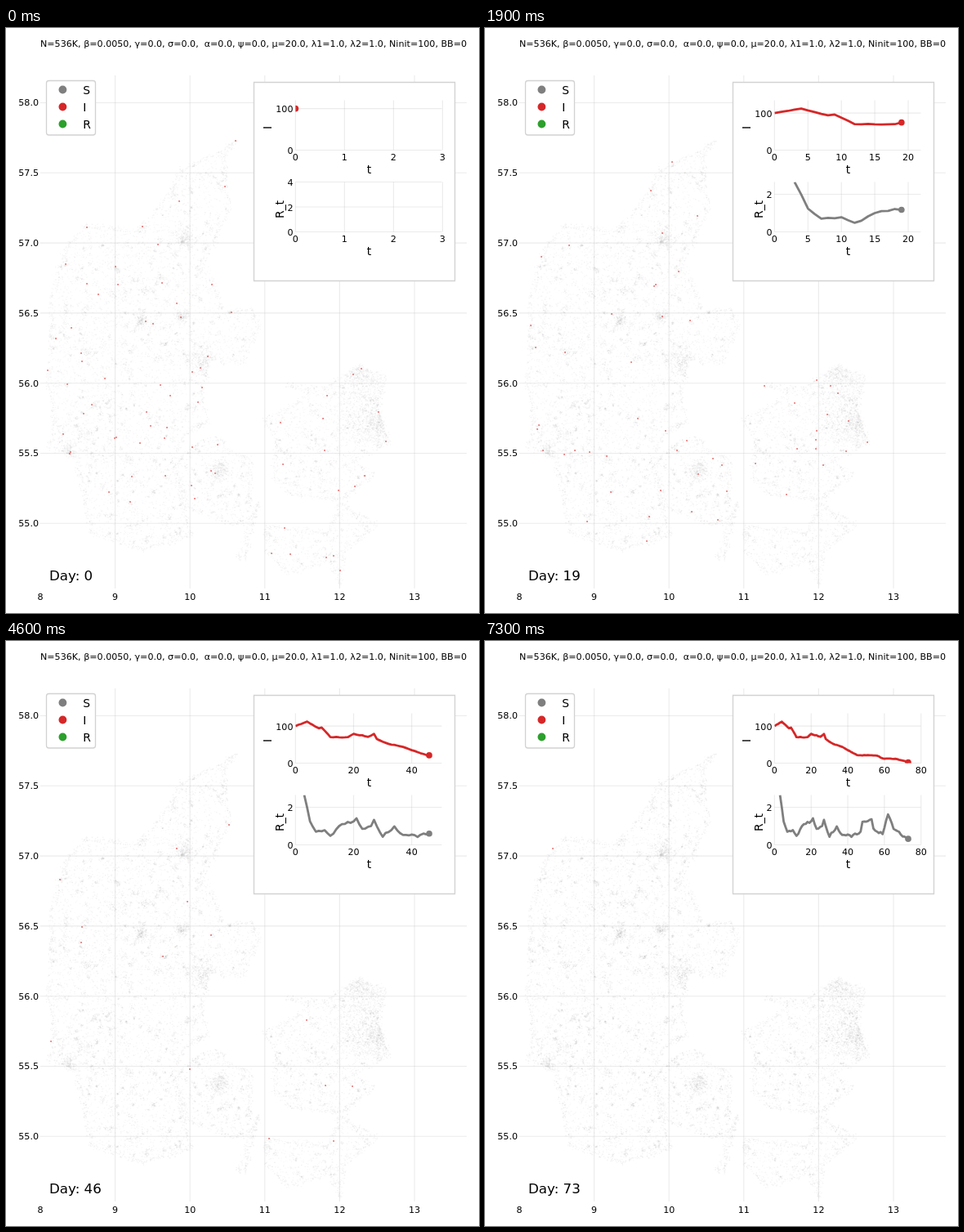
An HTML page with a canvas for the animation above (8 s loop, 579 by 716 pixels).

```html
<!DOCTYPE html>
<html lang="en">
<head>
<meta charset="utf-8">
<title>Epidemic map</title>
<style>
html, body { margin: 0; width: 100%; height: 100%; overflow: hidden; background: #fff; }
canvas { display: block; width: 579px; height: 716px; }
</style>
</head>
<body>
<canvas id="stage" width="579" height="716"></canvas>
<script>
const W = 579, H = 716, DAY_MS = 100, LOOP_MS = 8000, LAST_DAY = 73;
const GREY = '#7f7f7f', RED = '#d62728', GREEN = '#2ca02c';
const ctx = document.getElementById('stage').getContext('2d');

function makeRandom(seed) {
  return () => {
    seed = seed + 0x6D2B79F5 | 0;
    let t = Math.imul(seed ^ seed >>> 15, 1 | seed);
    t = t + Math.imul(t ^ t >>> 7, 61 | t) ^ t;
    return ((t ^ t >>> 14) >>> 0) / 4294967296;
  };
}

const random = makeRandom(536);
const gauss = () => (random() + random() + random() + random() - 2) * 1.7;
const points = text => text.split(' ').map(p => p.split(',').map(Number));

// Daily series through a few turning points, with a little noise between them
function series(turns, noise) {
  const wobble = makeRandom(20);
  const values = [];
  turns.slice(1).forEach(([end, to], i) => {
    const [start, from] = turns[i];
    values[start] = from;
    for (let d = start + 1; d <= end; d++) {
      const level = from + (to - from) * (d - start) / (end - start);
      values[d] = d < end ? level + (wobble() - .5) * noise : to;
    }
  });
  return values;
}

const infected = series(points('0,100 4,112 8,94 9,96 12,70 18,70 20,79 25,71 27,79 28,65 32,52 ' +
  '38,41 45,22 56,20 59,13 66,12 73,2'), 2);
const reproduction = series(points('3,2.65 5,1.24 7,.7 10,.78 12,.48 16,1.1 19,1.17 21,1.41 23,.85 26,1 27,1.33 ' +
  '30,.43 34,.98 36,.62 42,.42 47,.7 48,1.22 53,1.36 54,.87 59,.57 62,1.62 65,.85 73,.32'), .15);

const lands = [
  // Jutland
  '281,137 262,152 214,172 203,195 176,234 158,248 96,241 72,270 55,330 52,440 59,480 52,512 86,526 103,617 ' +
  '165,637 226,622 203,530 218,498 246,482 238,450 249,405 289,409 309,365 302,345 265,346 242,285 273,220 266,158',
  // Funen and Langeland
  '206,532 236,506 262,502 272,518 299,526 297,602 275,606 222,586',
  '309,578 292,650 284,648 295,612',
  // Zealand
  '315,480 346,464 372,447 344,436 388,442 413,424 432,413 464,426 455,466 469,506 424,530 448,547 410,577 ' +
  '347,570 327,549 330,500',
  // Lolland and Falster
  '317,610 393,617 410,578 424,592 455,606 414,640 408,680 394,650 346,667 318,641'
].map(points);

// x, y and size of the larger towns
const cities = points('456,488,11 446,468,19 432,422,10 240,408,8 260,541,7 218,257,6 75,520,5 215,352,4 165,358,4');

const outline = new Path2D();
for (const land of lands) {
  const shape = new Path2D();
  land.forEach(([x, y]) => shape.lineTo(x, y));
  shape.closePath();
  outline.addPath(shape);
}
const onLand = (x, y) => ctx.isPointInPath(outline, x, y);

function landSpot() {
  for (;;) {
    const x = 50 + random() * 422, y = 134 + random() * 548;
    if (onLand(x, y)) return [x, y];
  }
}

const homes = [];

function makeMap() {
  const map = document.createElement('canvas');
  map.width = W;
  map.height = H;
  const pen = map.getContext('2d');
  pen.fillStyle = GREY;
  const dot = (x, y, strength) => {
    pen.globalAlpha = strength * (.6 + random() * .8);
    pen.fillRect(x, y, .9 + random() * .9, .9 + random() * .7);
    homes.push([x, y]);
  };
  const cluster = (x, y, spread, count) => {
    for (let i = 0; i < count; i++) {
      const px = x + gauss() * spread, py = y + gauss() * spread;
      if (onLand(px, py)) dot(px, py, .08);
    }
  };
  for (let i = 0; i < 6200; i++) dot(...landSpot(), .065);
  for (let i = 0; i < 560; i++) cluster(...landSpot(), .8 + random() * 1.7, 4 + random() * 10);
  for (const [x, y, size] of cities) cluster(x, y, size, size * 38);
  for (const land of lands) land.forEach(([x, y], i) => {
    const [u, v] = land[(i + 1) % land.length];
    const count = Math.hypot(u - x, v - y) * .9;
    for (let k = 0; k < count; k++) {
      const f = random();
      dot(x + (u - x) * f + gauss() * 1.8, y + (v - y) * f + gauss() * 1.8, .08);
    }
  });
  return map;
}
const map = makeMap();

// Every case stays at one home for a week, then moves on to another
function casesOn(day) {
  return Array.from({ length: Math.round(infected[day] * .72) }, (_, slot) => {
    const spell = Math.floor((day + slot * 3 % 7) / 7);
    const pick = makeRandom(slot * 977 + spell * 31337)();
    return homes[Math.floor(pick * homes.length)];
  });
}

function text(value, x, y, size = 11.11, align = 'left') {
  ctx.font = `${size}px "DejaVu Sans", sans-serif`;
  ctx.textAlign = align;
  ctx.fillStyle = '#000';
  ctx.fillText(value, x, Math.round(y));
}

function sideText(value, x, y) {
  ctx.save();
  ctx.translate(x, y);
  ctx.rotate(-Math.PI / 2);
  text(value, 0, 0, 13.89, 'center');
  ctx.restore();
}

function disc(x, y, radius, colour) {
  ctx.fillStyle = colour;
  ctx.beginPath();
  ctx.arc(x, y, radius, 0, 7);
  ctx.fill();
}

function gridLine(x1, y1, x2, y2) {
  ctx.strokeStyle = 'rgba(176,176,176,.25)';
  ctx.lineWidth = 1.1;
  ctx.beginPath();
  ctx.moveTo(x1, y1);
  ctx.lineTo(x2, y2);
  ctx.stroke();
}

function panel(x, y, w, h, radius) {
  ctx.beginPath();
  ctx.roundRect(x, y, w, h, radius);
  ctx.fillStyle = '#fff';
  ctx.fill();
  ctx.strokeStyle = '#d2d2d2';
  ctx.lineWidth = 1.3;
  ctx.stroke();
}

function plot(day, top, values, firstDay, yMax, yStep, colour) {
  const left = 354.4, width = 180, height = 61, bottom = top + height;
  const xMax = Math.max(day + 3, day * 1.1);
  const px = d => left + d / xMax * width;
  const py = v => bottom - v / yMax * height;
  const step = [1, 2, 2.5, 5, 10, 20].find(s => s >= xMax / 5);

  for (let d = 0; d <= xMax; d += step) {
    gridLine(px(d), top, px(d), bottom);
    text(step === 2.5 ? d.toFixed(1) : d, px(d), bottom + 12.5, 11.11, 'center');
  }
  for (let v = 0; v <= yMax; v += yStep) {
    gridLine(left, py(v), left + width - 1, py(v));
    text(v, 351.5, py(v) + 4.6, 11.11, 'right');
  }
  text('t', 444.4, bottom + 28.5, 13.89, 'center');

  if (day < firstDay) return;
  ctx.save();
  ctx.beginPath();
  ctx.rect(left, top, width, height);
  ctx.clip();
  ctx.beginPath();
  for (let d = firstDay; d <= day; d++) ctx.lineTo(px(d), py(values[d]));
  ctx.strokeStyle = colour;
  ctx.lineWidth = 2.78;
  ctx.lineJoin = 'round';
  ctx.stroke();
  disc(px(day), py(values[day]), 3.8, colour);
  ctx.restore();
}

function draw(day) {
  ctx.fillStyle = '#fff';
  ctx.fillRect(0, 0, W, H);
  text('N=536K, β=0.0050, γ=0.0, σ=0.0,  α=0.0, ψ=0.0, μ=20.0, λ1=1.0, λ2=1.0, Ninit=100, BB=0', 42, 23);

  for (let lon = 8; lon <= 13; lon++) {
    const x = 42 + (lon - 8) * 91.6;
    if (lon > 8) gridLine(x, 58, x, 686);
    text(lon, x, 700, 11.11, 'center');
  }
  for (let lat = 55; lat <= 58; lat += .5) {
    const y = 91.5 + (58 - lat) * 171.6;
    gridLine(42, y, 564, y);
    text(lat.toFixed(1), 40, y + 3.9, 11.11, 'right');
  }

  ctx.globalAlpha = .85 + .15 * day / LAST_DAY;
  ctx.drawImage(map, 0, 0);
  ctx.globalAlpha = .7;
  ctx.fillStyle = RED;
  for (const [x, y] of casesOn(day)) ctx.fillRect(Math.round(x) - .8, Math.round(y) - .8, 1.7, 1.6);
  ctx.globalAlpha = 1;

  text('Day: ' + day, 53, 676, 16.67);

  panel(49.5, 64.5, 60, 66.5, 3);
  [['S', GREY], ['I', RED], ['R', GREEN]].forEach(([label, colour], i) => {
    disc(69.4, 75.5 + i * 21, 4.9, colour);
    text(label, 94.3, 81 + i * 21, 13.89);
  });

  panel(303.5, 66.5, 246, 243, 0);
  const peak = Math.max(...infected.slice(0, day + 1));
  plot(day, 88.5, infected, 0, peak * 1.2, 100, RED);
  plot(day, 188.5, reproduction, 3, day < 3 ? 4 : 2.65, 2, GREY);
  sideText('I', 325, 122);
  sideText('R_t', 340, 222);
}

const start = performance.now();
let shown = -1;
function tick() {
  const day = Math.min(LAST_DAY, Math.floor((performance.now() - start) % LOOP_MS / DAY_MS));
  if (day !== shown) draw(shown = day);
  requestAnimationFrame(tick);
}
tick();
</script>
</body>
</html>
```
